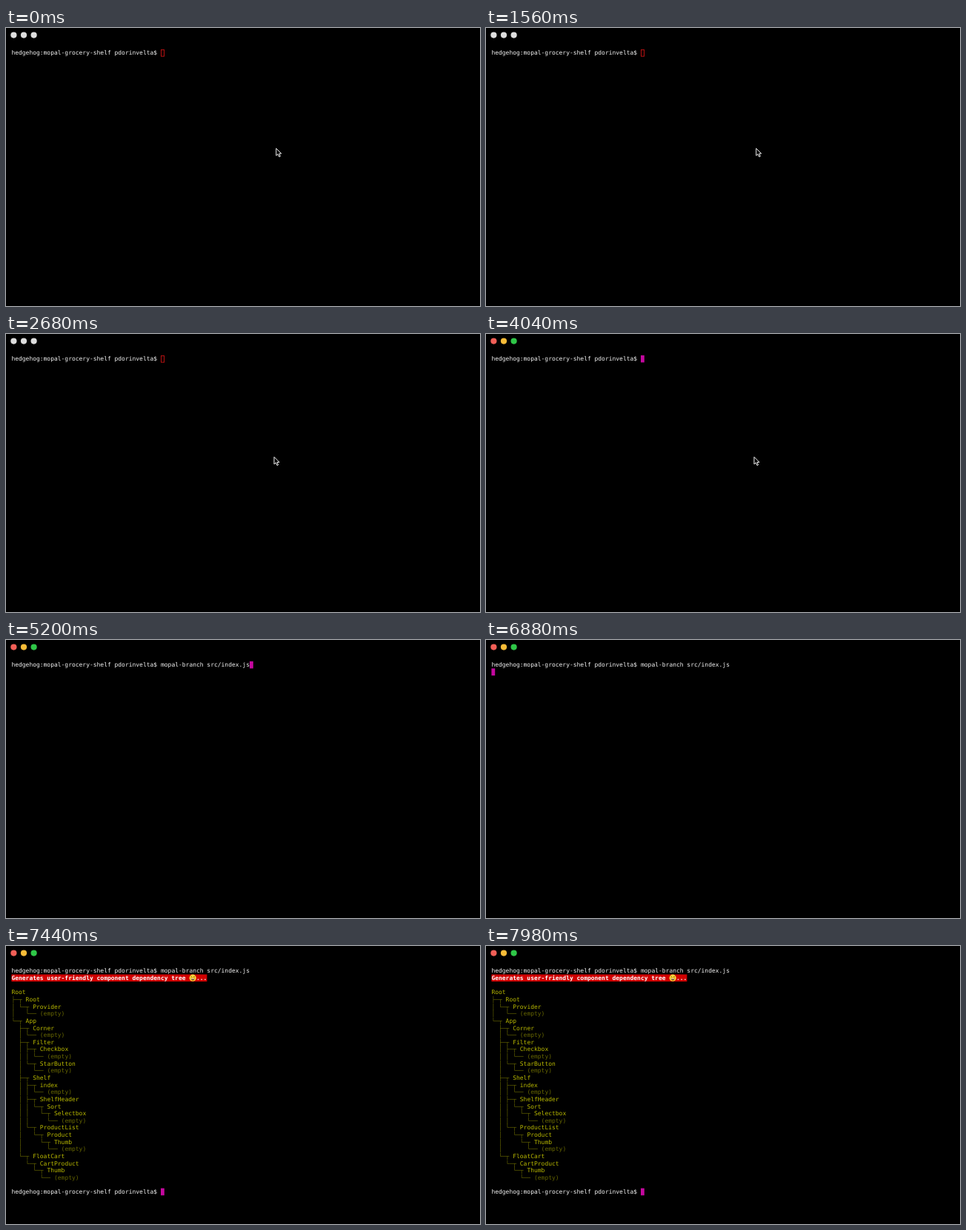
These frames come from a looping animation (640 px wide and 376 px high, 8000 ms). An HTML page:

```html
<!DOCTYPE html>
<html lang="en">
<head>
<meta charset="utf-8">
<title>Terminal</title>
<style>
  html, body { margin: 0; width: 100%; height: 100%; overflow: hidden; background: #000; }
  svg { display: block; width: 640px; height: 376px; }
  text {
    font: 7.973px "DejaVu Sans Mono", monospace;
    white-space: pre;
    text-rendering: geometricPrecision;
  }
  .bold { font-weight: bold; }
</style>
</head>
<body>
<svg id="stage" viewBox="0 0 640 376"></svg>
<script>
const LOOP = 8000;
const LEFT = 7.4, TOP = 28.8, CELL = 4.8, ROW = 9.64;
const COLORS = {
  text: '#f4f4f4', name: '#b9b900', branch: '#666600',
  banner: '#d00000', bannerText: '#ffffff', cursor: '#c4089f', idleCursor: '#b51212',
  idleDot: '#dddddd', pointer: '#f4f4f4'
};
const PROMPT = 'hedgehog:mopal-grocery-shelf pdorinvelta$ ';
const COMMAND = 'mopal-branch src/index.js';
const BANNER = 'Generates user-friendly component dependency tree ';

// Moments of the hard changes, in ms
const FOCUS = 2980, RECALL = 4640, ENTER = 6240, REPORT = 7140, DONE = 7420;

const TREE = {
  Root: { Provider: {} },
  App: {
    Corner: {},
    Filter: { Checkbox: {}, StarButton: {} },
    Shelf: {
      index: {},
      ShelfHeader: { Sort: { Selectbox: {} } },
      ProductList: { Product: { Thumb: {} } }
    },
    FloatCart: { CartProduct: { Thumb: {} } }
  }
};

const stage = document.getElementById('stage');
const timed = [];
const colX = col => LEFT + col * CELL;
const rowY = row => TOP + row * ROW;

function add(tag, attrs, parent = stage) {
  const node = document.createElementNS('http://www.w3.org/2000/svg', tag);
  for (const key in attrs) node.setAttribute(key, attrs[key]);
  return parent.appendChild(node);
}

function group(from, to = LOOP) {
  const node = add('g', {});
  timed.push({ node, from, to });
  return node;
}

function write(parent, row, col, string, fill, cls = '') {
  add('text', { x: colX(col), y: rowY(row) + 7.6, fill, class: cls }, parent).textContent = string;
}

function dots(parent, fills) {
  fills.forEach((fill, i) => add('circle', { cx: 10.4 + i * 13.6, cy: 9.6, r: 4.1, fill }, parent));
}

function treeLines(children, prefix = '') {
  const names = Object.keys(children);
  if (!names.length) return [{ branch: prefix + '└── ', name: '(empty)', fill: COLORS.branch }];
  return names.flatMap((name, i) => {
    const last = i === names.length - 1;
    return [
      { branch: prefix + (last ? '└─┬ ' : '├─┬ '), name, fill: COLORS.name },
      ...treeLines(children[name], prefix + (last ? '  ' : '│ '))
    ];
  });
}

function smiley(parent, x, y) {
  const face = add('g', { transform: `translate(${x} ${y})` }, parent);
  add('circle', { r: 4.6, fill: '#ffd83a' }, face);
  add('path', { d: 'M-2.7-1.1q.9-1.4 1.8 0M.9-1.1q.9-1.4 1.8 0', fill: 'none', stroke: '#5a3000', 'stroke-width': .8 }, face);
  add('path', { d: 'M-2.8.7H2.8Q2.2 3.4 0 3.4T-2.8.7Z', fill: '#6b3000' }, face);
  add('path', { d: 'M-2.4.8H2.4L2.1 1.6H-2.1Z', fill: '#fff' }, face);
}

add('rect', { width: 640, height: 376, fill: '#000' });
dots(group(0, FOCUS), Array(3).fill(COLORS.idleDot));
dots(group(FOCUS), ['#f25f57', '#f8bc38', '#2fc748']);

write(stage, 0, 0, PROMPT, COLORS.text);
write(group(RECALL), 0, PROMPT.length, COMMAND, COLORS.text);

const banner = group(REPORT);
add('rect', { x: LEFT, y: rowY(1), width: 55 * CELL, height: ROW, fill: COLORS.banner }, banner);
write(banner, 1, 0, BANNER, COLORS.bannerText, 'bold');
smiley(banner, colX(BANNER.length + 1), rowY(1) + 4.7);
write(banner, 1, BANNER.length + 2, '...', COLORS.bannerText, 'bold');

const report = group(DONE);
const lines = [{ branch: '', name: 'Root', fill: COLORS.name }, ...treeLines(TREE)];
lines.forEach(({ branch, name, fill }, i) => {
  write(report, 3 + i, 0, branch, COLORS.branch);
  write(report, 3 + i, branch.length, name, fill);
});
const lastRow = 3 + lines.length + 1;
write(report, lastRow, 0, PROMPT, COLORS.text);

add('rect', {
  x: colX(PROMPT.length) + .5, y: rowY(0) + .6, width: 4, height: 8.8,
  fill: 'none', stroke: COLORS.idleCursor
}, group(0, FOCUS));

const cursorSteps = [
  [FOCUS, 0, PROMPT.length],
  [RECALL, 0, PROMPT.length + COMMAND.length],
  [ENTER, 1, 0],
  [REPORT, 3, 0],
  [DONE, lastRow, PROMPT.length]
];
cursorSteps.forEach(([from, row, col], i) => {
  const to = i + 1 < cursorSteps.length ? cursorSteps[i + 1][0] : LOOP;
  add('rect', { x: colX(col), y: rowY(row), width: CELL, height: ROW, fill: COLORS.cursor }, group(from, to));
});

const pointer = group(0, RECALL);
add('path', {
  d: 'M0 0V9.8L2.3 7.7 4 11.4 5.6 10.7 4 7.1H7Z',
  fill: '#000', stroke: COLORS.pointer, 'stroke-linejoin': 'round'
}, pointer);

function draw(now) {
  const time = now % LOOP;
  for (const { node, from, to } of timed) {
    node.style.display = time >= from && time < to ? '' : 'none';
  }
  const p = Math.min(1, Math.max(0, (time - 1800) / 500));
  const ease = p * p * (3 - 2 * p);
  pointer.setAttribute('transform', `translate(${364.8 - 2.8 * ease} ${162.8 + 3.5 * ease})`);
}

const start = performance.now();
function tick() {
  draw(performance.now() - start);
  requestAnimationFrame(tick);
}
tick();
</script>
</body>
</html>
```
